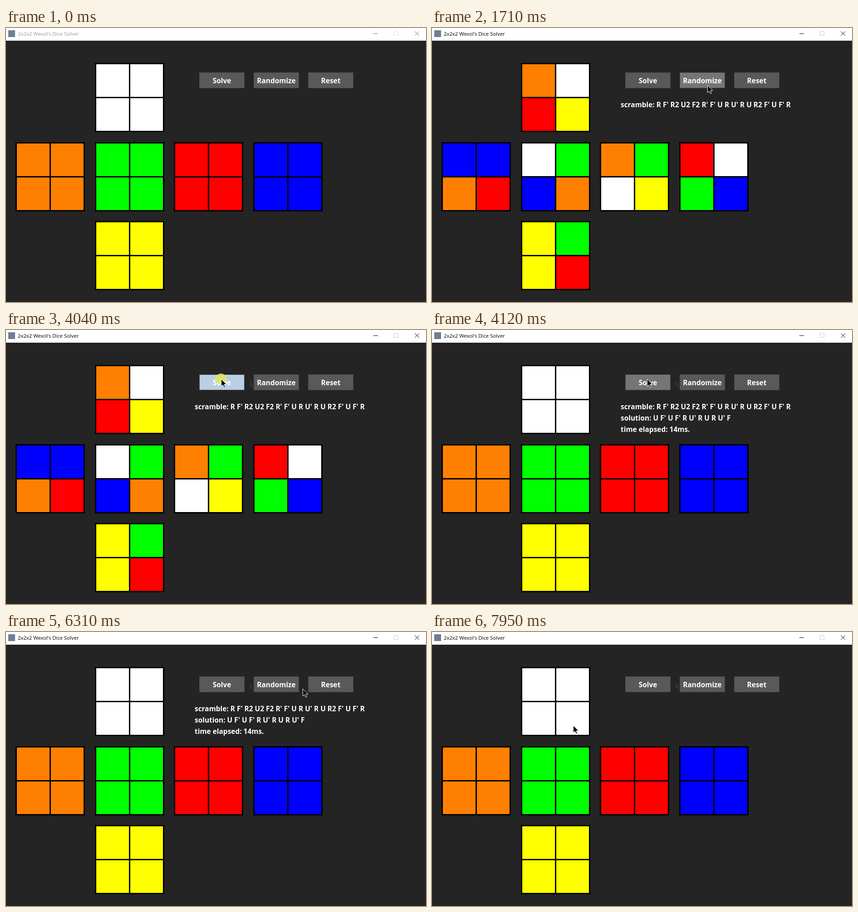
An HTML page for the animation above (8 s loop, 926x605 px).

```html
<!DOCTYPE html>
<html lang="en">
<head>
<meta charset="utf-8">
<title>2x2x2 Wexol's Dice Solver</title>
<style>
  html, body { margin: 0; width: 100%; height: 100%; overflow: hidden; background: #242424; }
  svg { display: block; width: 926px; height: 605px; }
  text { font: 700 15.45px "Open Sans", "Noto Sans", sans-serif; fill: #fff; white-space: pre; }
  #title { font-weight: 400; font-size: 11.3px; }
  .button text { text-anchor: middle; }
</style>
</head>
<body>
<svg id="stage" viewBox="0 0 926 605">
  <rect width="926" height="605" fill="#242424"/>
  <rect width="926" height="28" fill="#fff"/>
  <rect x="5" y="5" width="15" height="15" fill="#6d7f96"/>
  <text id="title" x="26" y="17">2x2x2 Wexol's Dice Solver</text>
  <path id="controls" d="M810 12.5h10M901.5 7.5l9.5 9.5M911 7.5l-9.5 9.5" fill="none"/>
  <rect id="maximize" x="855.5" y="7.5" width="9" height="9" fill="none"/>
  <g id="cube"></g>
  <g id="buttons"></g>
  <path id="trace" transform="translate(537 111)" fill="#303030"/>
  <text id="scramble" x="416" y="175">scramble: R F' R2 U2 F2 R' F' U R U' R U R2 F' U F' R</text>
  <g id="solution">
    <text x="416" y="200">solution: U F' U F' R U' R U R U' F</text>
    <text x="416" y="225">time elapsed: 14ms.</text>
  </g>
  <g id="pointer">
    <circle id="halo" r="12" fill="#e4e650" fill-opacity=".82"/>
    <path id="arrow" transform="translate(.5 .5)" fill="#000" stroke="#fff"/>
  </g>
</svg>
<script>
const LOOP = 8000, TICK = 78.1, LEAD = 135;
const COLORS = { W: '#fff', O: '#ff8000', G: '#0f0', R: '#f00', B: '#00f', Y: '#ff0' };
const FACES = [[196, 77], [21, 252], [196, 252], [370, 252], [545, 252], [196, 426]];
const SOLVED = 'WWWWOOOOGGGGRRRRBBBBYYYY';
const SCRAMBLED = 'OWRYBBORWGBOOGWYRWGBYGYR';
const ARROW = 'M0 0V16L3.7 12.6L6.2 18.4L8.8 17.3L6.4 11.6H11.4Z';

const linear = p => p;
const smooth = p => p * p * (3 - 2 * p);
const slowing = p => 1 - (1 - p) ** 2;

// Pointer keys in ticks: tick, x, y, easing towards this key
const PATH = [
  [-1, 940, 625], [0, 915, 588, linear], [10, 681, 196, slowing],
  [11, 667, 181, linear], [12, 656, 168, linear], [18, 607, 126, slowing],
  [29, 607, 126, linear], [40, 479, 108, smooth], [42, 474, 108, linear],
  [69, 474, 108, linear], [70, 478, 110, linear], [80, 659, 125, smooth],
  [84, 688, 122, slowing], [93, 688, 122, linear],
  [98, 410, 221, smooth], [100, 311, 206, linear]
];
const PRESSES = [19, 50, 87];

const $ = id => document.getElementById(id);
const show = (el, on) => el.setAttribute('visibility', on ? 'visible' : 'hidden');

function add(parent, tag, attrs) {
  const el = document.createElementNS('http://www.w3.org/2000/svg', tag);
  for (const key in attrs) el.setAttribute(key, attrs[key]);
  return parent.appendChild(el);
}

const stickers = [];
for (const [x, y] of FACES) {
  add($('cube'), 'rect', { x, y, width: 153, height: 153, fill: '#000' });
  for (let i = 0; i < 4; i++) {
    stickers.push(add($('cube'), 'rect', {
      x: x + 3 + 75 * (i % 2), y: y + 3 + 75 * (i >> 1), width: 72, height: 72
    }));
  }
}

const buttons = ['Solve', 'Randomize', 'Reset'].map((label, i) => {
  const x = 426 + 120 * i;
  const group = add($('buttons'), 'g', { class: 'button' });
  const box = add(group, 'rect', { x: x + .5, y: 98.5, width: 99, height: 34, stroke: '#494949' });
  add(group, 'text', { x: x + 50, y: 122 }).textContent = label;
  return { x, box };
});

$('trace').setAttribute('d', ARROW);
$('arrow').setAttribute('d', ARROW);

function pointerAt(tick) {
  const i = PATH.findIndex(key => key[0] >= tick);
  if (i < 0) return PATH[PATH.length - 1].slice(1, 3);
  if (i === 0) return PATH[0].slice(1, 3);
  const [t0, x0, y0] = PATH[i - 1], [t1, x1, y1, ease] = PATH[i];
  const p = ease((tick - t0) / (t1 - t0));
  return [Math.round(x0 + (x1 - x0) * p), Math.round(y0 + (y1 - y0) * p)];
}

function draw(time) {
  const tick = Math.max(-1, Math.floor((time - LEAD) / TICK));
  const [x, y] = pointerAt(tick);
  const pressed = PRESSES.includes(tick);
  const active = tick >= 19;

  $('title').style.fill = active ? '#000' : '#999';
  $('controls').setAttribute('stroke', active ? '#000' : '#777');
  $('maximize').setAttribute('stroke', active ? '#ccc' : '#e6e6e6');

  const colors = tick >= 20 && tick < 51 ? SCRAMBLED : SOLVED;
  stickers.forEach((el, i) => el.setAttribute('fill', COLORS[colors[i]]));

  for (const b of buttons) {
    const over = x >= b.x && x < b.x + 100 && y >= 98 && y < 133;
    b.box.setAttribute('fill', !over ? '#595959' : pressed ? '#b8cfe5' : '#757575');
  }

  show($('scramble'), tick >= 20 && tick < 88);
  show($('solution'), tick >= 51 && tick < 88);
  show($('trace'), tick >= 36);
  show($('halo'), pressed);
  $('pointer').setAttribute('transform', `translate(${x} ${y})`);
}

const start = performance.now();
function frame() {
  draw((performance.now() - start) % LOOP);
  requestAnimationFrame(frame);
}
frame();
</script>
</body>
</html>
```
